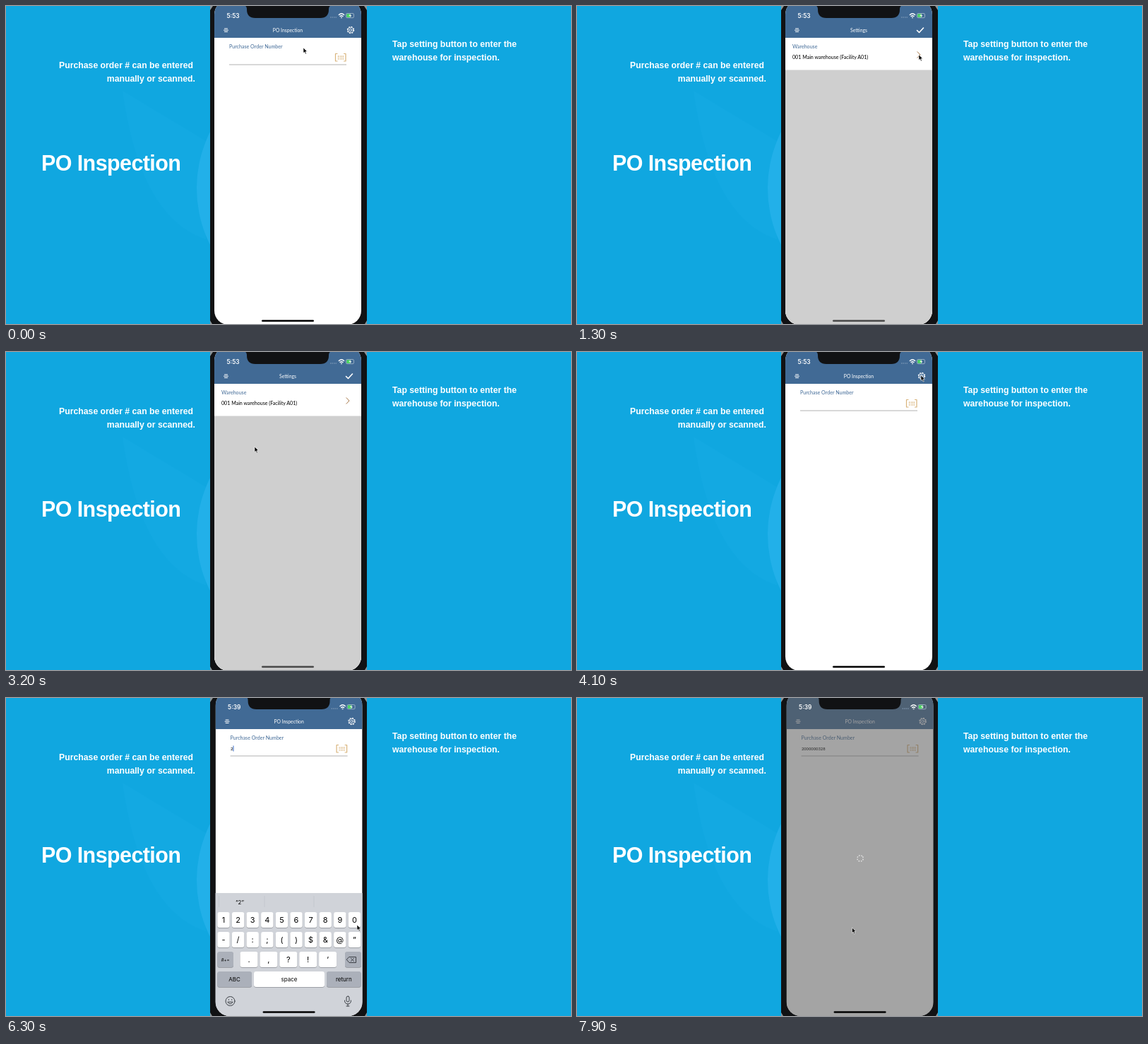
An HTML page for the animation above (8000 ms loop, 800 by 450 pixels).

```html
<!DOCTYPE html>
<html lang="en">
<head>
<meta charset="utf-8">
<title>PO Inspection</title>
<style>
  html, body { margin: 0; width: 100%; height: 100%; overflow: hidden; background: #10a7e0; }
  svg { display: block; width: 800px; height: 450px; }
  text { white-space: pre; }
  .caption { font: bold 12.25px "Liberation Sans", Arial, sans-serif; fill: #fff; }
  .title { font: bold 30.5px "Liberation Sans", Arial, sans-serif; letter-spacing: -.6px; fill: #fff; }
  .app { font: 7.1px Lato, sans-serif; }
  .label { fill: #416a97; }
  .row { font-size: 5.5px; fill: #666; }
  .key { font: 11px Inter, sans-serif; text-anchor: middle; }
  .small { font-size: 8px; }
  .line { fill: none; stroke-linecap: round; stroke-linejoin: round; }
  .end { text-anchor: end; }
  .mid { text-anchor: middle; }
</style>
</head>
<body>
<svg viewBox="0 0 800 450">
  <defs>
    <clipPath id="screen"><rect x="295" y="-8" width="208" height="459" rx="20"/></clipPath>
  </defs>

  <rect width="800" height="450" fill="#10a7e0"/>
  <path d="M165 120L283 191V330Q190 300 165 120Z" fill="#13a9e2"/>
  <circle cx="448" cy="258" r="178" fill="#22b0e9" clip-path="inset(0 66% 0 0)"/>

  <text class="caption end" x="265" y="88">Purchase order # can be entered</text>
  <text class="caption end" x="268" y="107">manually or scanned.</text>
  <text class="title" x="50" y="233">PO Inspection</text>
  <text class="caption" x="547" y="58">Tap setting button to enter the</text>
  <text class="caption" x="547" y="77">warehouse for inspection.</text>

  <rect x="289" width="222" height="450" fill="#111214"/>
  <path d="M289 0h4l-4 6zM511 0h-4l4 6zM289 450h3l-3-5zM511 450h-3l3-5z" fill="#8b9297"/>

  <g id="app" class="app">
    <g clip-path="url(#screen)">
      <rect x="295" y="0" width="208" height="451" fill="#fff"/>
      <text class="label" x="316" y="60">Purchase Order Number</text>
      <text id="value" x="316.3" y="75" font-size="5.8" font-weight="bold" fill="#333"></text>
      <rect id="caret" y="68.5" width="1" height="8" fill="#3569c8"/>
      <path d="M316 83H482" stroke="#a9a9a9" stroke-width=".9"/>
      <g class="line" stroke="#d8b37a" stroke-width="1.2">
        <path d="M469 67.5h-2.500v10.500h2.500M478.500 67.500h2.500v10.500h-2.500"/>
        <path d="M470.500 70.500v5M473 70.500v5M475.200 70.500v5M477.400 70.500v5" stroke-width=".9" stroke-dasharray="2 1.500"/>
      </g>

      <g id="panel">
        <rect x="295" y="45" width="208" height="420" fill="#fff"/>
        <g id="list"><rect x="305" y="120.500" width="188" height="88" fill="#efefef"/></g>
        <g id="warehouse">
          <text class="label" x="305" y="60">Warehouse</text>
          <text x="305" y="75">001 Main warehouse (Facility A01)</text>
          <path id="chevron" class="line"/>
        </g>
        <rect id="shade" x="295" width="208" height="420" fill="#cfcfcf"/>
      </g>

      <g id="keyboard">
        <rect x="296" y="276" width="210" height="180" fill="#d0d3d9"/>
        <path d="M301.500 280v16M366 280v16M436 280v16" stroke="#bfc3ca" stroke-width=".7"/>
        <text id="hint" class="key small" x="331" y="291.500"></text>
        <g class="line" stroke="#3c4046" stroke-width="1">
          <path d="M486 366.500h9.500v8h-9.500l-3.500-4zM488.500 368.500l4 4M492.500 368.500l-4 4"/>
          <circle cx="317.500" cy="429" r="6.500"/>
          <path d="M314 430.500q3.500 5 7 0zM315.300 426.500v.8M319.700 426.500v.8"/>
          <rect x="482" y="422" width="4" height="8" rx="2"/>
          <path d="M479.500 428q0 5 4.500 5t4.500-5M484 433v3M482 436h4"/>
        </g>
      </g>

      <rect x="295" y="-1" width="208" height="46" fill="#416a95"/>
      <text id="heading" class="mid" x="399" y="37" font-size="6.8" fill="#fff"></text>
      <path class="line" d="M309.500 32h4M308.500 34.200h6M309.500 36.400h4" stroke="#fff" stroke-width="1"/>
      <g id="gear" class="line" stroke="#fff" transform="translate(488 34)">
        <circle r="4.700" stroke-width="1.100" stroke-dasharray="1.850 1.850" stroke-linecap="butt"/>
        <circle r="3.800" stroke-width=".9"/>
        <circle r="1.700" stroke-width=".8"/>
      </g>
      <path id="check" class="line" d="M481.500 34.500l3 3 6-6.500" stroke="#fff" stroke-width="1.600"/>

      <g id="loading">
        <rect x="295" y="-1" width="208" height="452" fill="#5a5a5a" fill-opacity=".55"/>
        <circle id="spinner" cx="399.500" cy="228" r="4.200" fill="none" stroke="#e2e2e2" stroke-width="1.500" stroke-dasharray="1.650 1.650"/>
      </g>

      <text id="clock" x="312.500" y="17" font-family="Inter, sans-serif" font-size="8.300" font-weight="600" fill="#fff"></text>
      <path d="M459 16h9" stroke="#8ba4bf" stroke-dasharray="1.500 1"/>
      <g class="line" stroke="#fff" stroke-width="1.300">
        <path d="M471.300 12.500q3.700-3.500 7.400 0M473 14.600q2-1.800 4 0"/>
        <circle cx="475" cy="16.400" r=".3"/>
      </g>
      <rect x="481.500" y="10.500" width="11" height="6.200" rx="1.500" fill="none" stroke="#a9bccf" stroke-width=".8"/>
      <rect x="482.300" y="11.300" width="5.500" height="4.600" rx=".8" fill="#4fd964"/>
      <path d="M488 10.800l-2.500 3.200h2l-.8 2.600 2.700-3.300h-2z" fill="#fff"/>
      <rect id="home" x="362" y="444.200" width="74" height="2.600" rx="1.300"/>
    </g>
    <path d="M337 -1Q341 0 341 4V5Q341 17 353 17H445Q457 17 457 5V4Q457 0 461 -1Z" fill="#111214"/>
  </g>

  <path id="cursor" d="M0 0V7.500L1.800 6 3 9 4.300 8.500 3.100 5.600 5.500 5.400Z" stroke="#fff" stroke-width=".6"/>
</svg>

<script>
const $ = id => document.getElementById(id);
const show = (id, on) => $(id).style.display = on ? '' : 'none';
const move = (id, x, y) => $(id).setAttribute('transform', `translate(${x} ${y})`);

function add(parent, tag, attrs, text = '') {
  const node = document.createElementNS('http://www.w3.org/2000/svg', tag);
  for (const name in attrs) node.setAttribute(name, attrs[name]);
  node.textContent = text;
  parent.append(node);
  return node;
}

[
  ['001', 'Main warehouse (Facility A01)'],
  ['002', 'Regional warehouse (Facility A01)'],
  ['101', 'Subcontractor warehouse (Fac A01)'],
  ['901', 'Main warehouse (Facility B01)'],
  ['ZIN', 'Installation wareh (Facility A01)']
].forEach(([code, name], i) => {
  const y = 131.7 + i * 17.6;
  add($('list'), 'text', { class: 'row', x: 325, y }, code);
  add($('list'), 'text', { class: 'row', x: 403, y }, name);
});

function addKey(text, x, y, width, dark, small) {
  const box = { x, width, height: 22, rx: 3 }, group = document.createElementNS($('app').namespaceURI, 'g');
  $('keyboard').insertBefore(group, $('hint'));
  add(group, 'rect', { ...box, y: y + .8, fill: '#8d9096' });
  add(group, 'rect', { ...box, y, fill: dark ? '#abb0ba' : '#fff' });
  add(group, 'text', { class: small ? 'key small' : 'key', x: x + width / 2, y: y + (small ? 13.8 : 15) }, text);
}
['1234567890', '-/:;()$&@”'].forEach((keys, row) =>
  [...keys].forEach((key, i) => addKey(key, 299.3 + i * 20.6, 303 + row * 28, 17.4)));
[...'.,?!’'].forEach((key, i) => addKey(key, 331.5 + i * 27.9, 359, 25));
addKey('', 480, 359, 23, true);
addKey('ABC', 299.3, 387, 48.7, true, true);
addKey('space', 351, 387, 100, false, true);
addKey('return', 454, 387, 48.7, true, true);
addKey('', 299.3, 359, 22.7, true);
add($('keyboard'), 'text', { class: 'key', x: 310.5, y: 372.5, style: 'font-size:6px' }, '#+=');

// Pointer path: time, x, y
const path = [
  [0, 421, 59], [450, 490, 34], [700, 491, 35], [1000, 491, 35], [1300, 484, 69], [1600, 484, 69],
  [2100, 392, 132], [2700, 392, 132], [3200, 352, 134], [3300, 352, 134], [3650, 487, 33], [4300, 487, 33],
  [4300, 333, 393], [4800, 333, 393], [5000, 332, 333], [5200, 362, 79], [5650, 362, 79],
  [6000, 330, 317], [6150, 330, 317], [6300, 497, 321], [6860, 497, 321], [7000, 349, 319],
  [7100, 330, 319], [7200, 453, 319], [7400, 478, 397], [7500, 478, 397], [7800, 389.500, 325], [8000, 389.500, 325]
];
const order = '2000000328';
const typedAt = [6100, 6400, 6490, 6580, 6670, 6760, 6850, 7000, 7100, 7200];

const clamp = v => Math.min(1, Math.max(0, v));
const easeOut = (t, start, length) => 1 - (1 - clamp((t - start) / length)) ** 2;
const smooth = p => p * p * (3 - 2 * p);

function pointer(t) {
  const next = path.findIndex(point => point[0] > t);
  const [t0, x0, y0] = path[next - 1], [t1, x1, y1] = path[next];
  const p = smooth((t - t0) / (t1 - t0));
  return [x0 + (x1 - x0) * p, y0 + (y1 - y0) * p];
}

function draw(t) {
  const second = t >= 4300;
  const settings = t >= 500 && t < 3800;
  move('app', second ? 1.6 : 0, second ? -1 : 0);
  $('clock').textContent = second ? '5:39' : '5:53';
  $('heading').textContent = settings ? 'Settings' : 'PO Inspection';
  show('gear', !settings);
  show('check', settings);
  $('home').setAttribute('fill', settings ? '#484848' : '#000');

  const raised = easeOut(t, 540, 400) - easeOut(t, 3700, 400);
  show('panel', raised > 0);
  move('panel', 0, 405 * (1 - raised));
  const open = easeOut(t, 1400, 300) - easeOut(t, 2750, 300);
  show('list', open > 0);
  move('warehouse', 0, 17.5 * open);
  $('shade').setAttribute('y', 90.5 + 122.5 * open);
  const chevron = $('chevron');
  chevron.setAttribute('d', open > .5 ? 'M481 68l3.300 3.300 3.300-3.300' : 'M482 64.800l4 4.200-4 4.200');
  chevron.setAttribute('stroke', open > .5 ? '#d4d4d4' : '#a97a4c');

  const keys = easeOut(t, 5450, 350) - easeOut(t, 7450, 300);
  const typed = order.slice(0, typedAt.filter(time => time <= t).length);
  show('keyboard', keys > 0);
  move('keyboard', -1.6, 1 + 176 * (1 - keys));
  $('hint').textContent = typed && `“${typed}”`;
  $('value').textContent = typed;
  show('caret', t >= 5400 && t < 7450);
  $('caret').setAttribute('x', 316.5 + typed.length * 3.36);

  show('loading', t >= 7600);
  $('spinner').setAttribute('transform', `rotate(${t * .36} 399.5 228)`);
  move('cursor', ...pointer(t));
}

function tick() {
  draw(Math.floor(performance.now() % 8000 / 100) * 100);
  requestAnimationFrame(tick);
}
tick();
</script>
</body>
</html>
```
